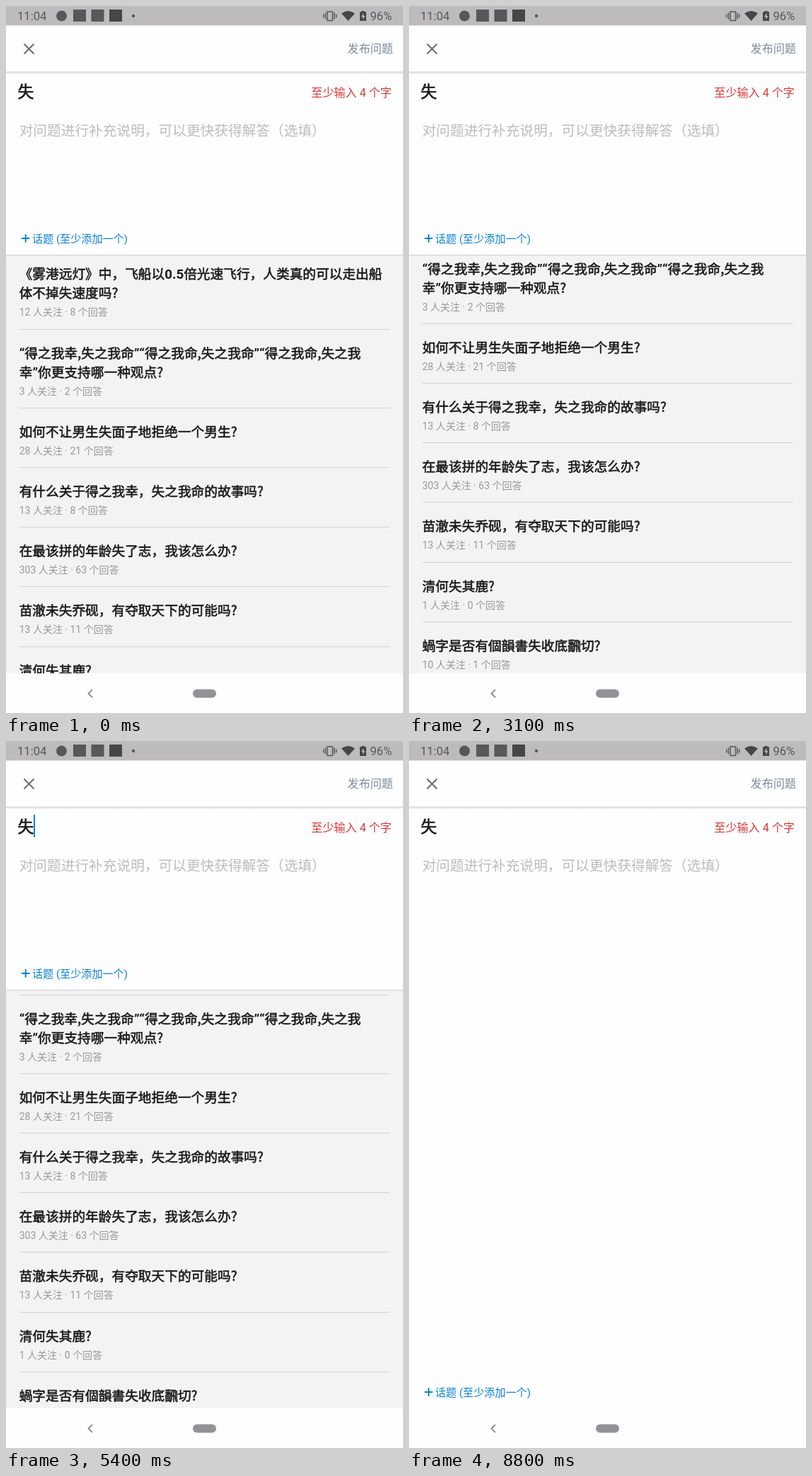
Write an HTML page that moves like this. It is 561 by 998 pixels and loops after 9.3 s.

```html
<!DOCTYPE html>
<html lang="zh-CN">
<head>
<meta charset="utf-8">
<title>提问</title>
<style>
html, body { margin: 0; width: 100%; height: 100%; overflow: hidden; background: #fefdff; }
svg { display: block; }
text { font-family: Roboto, "Noto Sans CJK SC", "Noto Sans CJK", sans-serif; white-space: pre; }
.title, .head { font-family: "Noto Sans CJK SC", "Noto Sans CJK", sans-serif; fill: #19191b; stroke: #19191b; }
.title { font-size: 18.7px; stroke-width: .55px; }
.latin { font-family: Roboto, sans-serif; font-weight: 700; stroke: none; }
.meta { font-size: 14px; fill: #99989b; }
.head { font-size: 22.8px; stroke-width: .65px; }
.hint { font-size: 19.7px; fill: #bcbbbe; }
.warn { font-size: 16.1px; fill: #d93a34; }
.post { font-size: 16.1px; fill: #7f8a9c; }
.topic { font-size: 15.1px; fill: #0a80d6; }
.status { font-size: 16.6px; fill: #58575a; }
</style>
</head>
<body>
<svg width="561" height="998" viewBox="0 0 561 998">
  <defs>
    <clipPath id="clip"><rect x="0" y="351" width="561" height="600"/></clipPath>
    <linearGradient id="shade" x1="0" y1="0" x2="0" y2="1">
      <stop offset="0" stop-color="#d3d2d5"/>
      <stop offset="1" stop-color="#d3d2d5" stop-opacity="0"/>
    </linearGradient>
  </defs>
  <rect width="561" height="998" fill="#fefdff"/>

  <text class="head" x="16.5" y="128.6">失</text>
  <rect id="caret" x="39" y="104" width="2" height="32" fill="#0a86e0"/>
  <text class="warn" x="431.3" y="127.8">至少输入 4 个字</text>
  <text class="hint" x="18.7" y="183.3">对问题进行补充说明，可以更快获得解答（选填）</text>

  <g id="panel">
    <path d="M22 328h11.5M27.75 322.2v11.6" stroke="#0a80d6" stroke-width="2"/>
    <text class="topic" x="37" y="333.8">话题 (至少添加一个)</text>
    <rect y="351" width="561" height="600" fill="#f4f2f5"/>
    <g clip-path="url(#clip)"><g id="list"></g></g>
    <rect y="351" width="561" height="2.5" fill="url(#shade)"/>
  </g>

  <rect y="92.5" width="561" height="4" fill="url(#shade)"/>
  <path d="M25.5 53.5l14 14m0-14l-14 14" stroke="#6c6b6e" stroke-width="2"/>
  <text class="post" x="482.6" y="66.3">发布问题</text>

  <rect width="561" height="27.5" fill="#bdbbbe"/>
  <text class="status" x="16" y="20">11:04</text>
  <g fill="#58575a">
    <circle cx="78.5" cy="14" r="7.5"/>
    <rect x="95" y="5" width="18" height="17"/>
    <rect x="120.5" y="5" width="18" height="17"/>
    <rect x="146" y="5" width="18" height="17" fill="#464548"/>
    <circle cx="180" cy="14" r="2.2"/>
    <path d="M474 10.5Q483.5 3.5 493 10.5L483.5 21Z" fill="#464548"/>
    <path d="M502.5 8.3V7h4v1.3h2.5V21h-9V8.3Z" fill="#464548"/>
    <path d="M505.3 10l-3.3 5.3h2.2v4l3.3-5.3h-2.2Z" fill="#bdbbbe"/>
    <path d="M454 8h7.5v12.5h-7.5ZM451.5 9.5v9M448.8 11.5v5M464 9.5v9M466.7 11.5v5" fill="none" stroke="#58575a" stroke-width="1.5"/>
  </g>
  <text class="status" x="514.5" y="20">96%</text>

  <rect y="942" width="561" height="56" fill="#fefdff"/>
  <path d="M122 965l-5.500 5.500 5.500 5.500" fill="none" stroke="#7b7a7d" stroke-width="1.7"/>
  <rect x="264" y="964.5" width="33" height="12" rx="6" fill="#949296"/>
</svg>
<script>
const LOOP = 9300, STEP = 100;
const $ = id => document.getElementById(id);

const items = [
  [12, 8, "《雾港远灯》中，飞船以0.5倍光速飞行，人类真的可以走出船", "体不掉失速度吗?"],
  [3, 2, "“得之我幸,失之我命”“得之我命,失之我命”“得之我命,失之我", "幸”你更支持哪一种观点?"],
  [28, 21, "如何不让男生失面子地拒绝一个男生?"],
  [13, 8, "有什么关于得之我幸，失之我命的故事吗?"],
  [303, 63, "在最该拼的年龄失了志，我该怎么办?"],
  [13, 11, "苗澈未失乔砚，有夺取天下的可能吗?"],
  [1, 0, "清何失其鹿?"],
  [10, 1, "蝸字是否有個韻書失收底飜切?"],
  [2, 0, "说话失了分寸怎么办"]
];

function add(parent, tag, attrs, text = "") {
  const el = document.createElementNS("http://www.w3.org/2000/svg", tag);
  for (const k in attrs) el.setAttribute(k, attrs[k]);
  el.textContent = text;
  parent.append(el);
  return el;
}

// digits and curly quotes use the Latin face, commas and "?" the Chinese one
function addTitle(list, y, s) {
  const el = add(list, "text", { class: "title", x: 18.7, y });
  for (const part of s.split(/([0-9.“”]+)/).filter(Boolean))
    add(el, "tspan", /^[0-9.“”]/.test(part) ? { class: "latin" } : {}, part);
}

const list = $("list");
let y = 344.8;
for (const [fans, replies, ...lines] of items) {
  lines.forEach((s, i) => addTitle(list, y + 40.5 + i * 27, s));
  y += 57.2 + lines.length * 27;
  add(list, "text", { class: "meta", x: 18.7, y: y - 18.6 }, `${fans} 人关注 · ${replies} 个回答`);
  add(list, "rect", { x: 18.7, y: Math.round(y - .4), width: 523.6, height: 1, fill: "#d2d1d4" });
}

// [time, value, easing into this point]
const ease = k => (1 - Math.cos(Math.PI * k)) / 2;
const line = k => k;
const scroll = [
  [1700, 0], [2500, 202, ease], [2600, 204, line], [2700, 202, line], [3600, 0, ease],
  [5100, 0], [5600, 150, ease], [6000, 49, line], [6100, 0, line]
];
const drop = [
  [3600, 0], [4100, 150, ease], [4300, 40, line], [4400, 7, line], [4500, 0, line],
  [6000, 0], [6100, 30, line], [6900, 591, ease]
];
// caret toggles, starting hidden
const blinks = [200, 700, 1200, 1700, 2200, 2700, 3200, 3700, 4300, 4800,
  5300, 5800, 6300, 6800, 7300, 7800, 8300, 8800];

function at(keys, t) {
  const i = keys.findIndex(k => k[0] > t);
  if (i === 0) return keys[0][1];
  if (i < 0) return keys[keys.length - 1][1];
  const [t0, a] = keys[i - 1], [t1, b, f = line] = keys[i];
  return a + (b - a) * f((t - t0) / (t1 - t0));
}

function draw() {
  const t = Math.floor(performance.now() % LOOP / STEP) * STEP;
  list.setAttribute("transform", `translate(0 ${-Math.round(at(scroll, t))})`);
  $("panel").setAttribute("transform", `translate(0 ${Math.round(at(drop, t))})`);
  $("caret").style.opacity = blinks.filter(b => b <= t).length % 2;
  requestAnimationFrame(draw);
}
draw();
</script>
</body>
</html>
```
